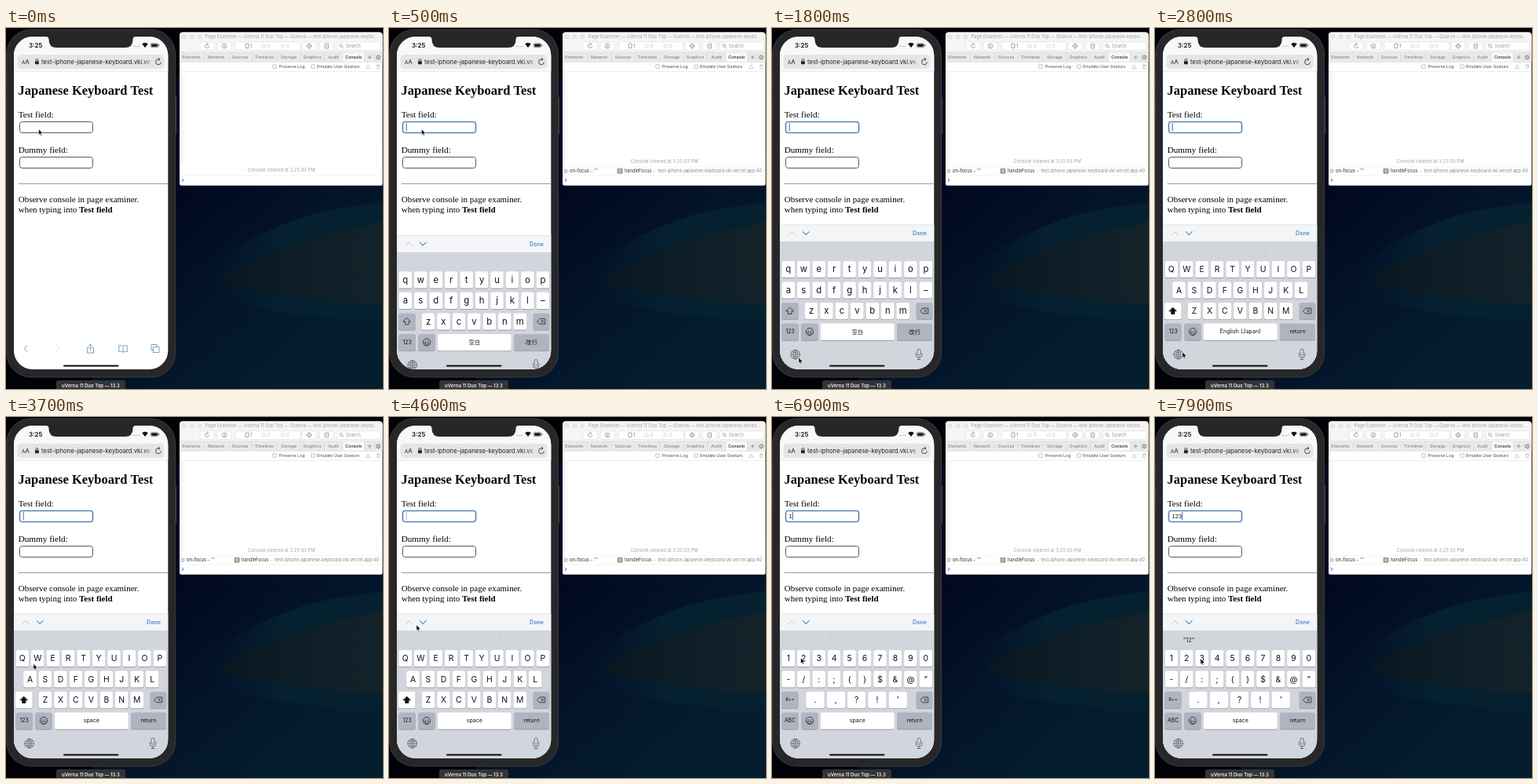
An HTML page with a canvas for the animation above (8 s loop, 480x460 px).

```html
<!DOCTYPE html>
<html lang="en">
<head>
<meta charset="utf-8">
<title>Japanese Keyboard Test</title>
<style>
html, body { margin: 0; width: 100%; height: 100%; overflow: hidden; background: #020a18; }
canvas { display: block; width: 480px; height: 460px; }
</style>
</head>
<body>
<canvas id="stage"></canvas>
<script>
const LOOP = 8000;
const UI = 'Inter, "Liberation Sans", sans-serif';
const SERIF = '"Liberation Serif", "Times New Roman", serif';
const CJK = '"Noto Sans CJK JP", "Noto Sans CJK", sans-serif';
const HOST = 'test-iphone-japanese-keyboard.vki.vercel.app';
const DEVICE = 'uVerna 11 Duo Top';
const BLUE = '#4a8acb', STEEL = '#5f8aad', FN = '#b0b4c0';

const canvas = document.getElementById('stage');
const g = canvas.getContext('2d');
const ratio = window.devicePixelRatio || 1;
canvas.width = 480 * ratio;
canvas.height = 460 * ratio;

const clamp = v => Math.max(0, Math.min(1, v));
const span = (t, a, b) => clamp((t - a) / (b - a));
const smooth = p => p * p * (3 - 2 * p);

function shape(x, y, w, h, r) {
  g.beginPath();
  g.roundRect(x, y, w, h, r);
}
function box(x, y, w, h, r, fill, line, lw = 1) {
  shape(x, y, w, h, r);
  if (fill) { g.fillStyle = fill; g.fill(); }
  if (line) { g.strokeStyle = line; g.lineWidth = lw; g.stroke(); }
}
function text(s, x, y, size, color, align = 'left', font = UI, weight = 400) {
  g.font = `${weight} ${size}px ${font}`;
  g.fillStyle = color;
  g.textAlign = align;
  g.textBaseline = 'alphabetic';
  g.fillText(s, x, y);
  return g.measureText(s).width;
}
function path(d, x, y, color, lw = 1, fill) {
  g.save();
  g.translate(x, y);
  const p = new Path2D(d);
  if (fill) { g.fillStyle = fill; g.fill(p); }
  if (color) {
    g.strokeStyle = color;
    g.lineWidth = lw;
    g.lineJoin = g.lineCap = 'round';
    g.stroke(p);
  }
  g.restore();
}
function ring(x, y, r, color, lw = 0.7, fill) {
  g.beginPath();
  g.arc(x, y, r, 0, 7);
  if (fill) { g.fillStyle = fill; g.fill(); }
  if (color) { g.strokeStyle = color; g.lineWidth = lw; g.stroke(); }
}
function reload(x, y, r, color, lw) {
  g.beginPath();
  g.arc(x, y, r, 0, 5.2);
  g.strokeStyle = color;
  g.lineWidth = lw;
  g.stroke();
  path('M-.5 -1.6L1.4 0L-.5 1.6', x + r * .2, y - r, color, lw);
}
function blend(x0, y0, x1, y1, ...colors) {
  const c = g.createLinearGradient(x0, y0, x1, y1);
  colors.forEach((s, i) => c.addColorStop(i / (colors.length - 1), s));
  return c;
}

function wallpaper() {
  g.fillStyle = blend(225, 200, 400, 400, '#010820', '#03132a', '#041d2f');
  g.fillRect(0, 0, 480, 460);
  g.fillStyle = '#000207';
  g.fillRect(0, 0, 110, 460);
  g.fillRect(0, 0, 480, 60);
  path('M250 325C270 285 320 262 370 244C410 230 440 228 480 222V372C410 370 290 365 250 325Z', 0, 0, null, 0,
    blend(250, 0, 350, 0, '#03182b00', '#05202f'));
  path('M272 322C292 302 316 296 340 286C380 266 425 262 480 246V352C420 350 400 346 350 340C315 336 290 332 272 322Z', 0, 0, null, 0,
    blend(272, 0, 480, 0, '#08161f', '#0e1e27', '#14232a'));
}

function inspector(t) {
  const logged = t >= 300;
  g.save();
  shape(221, 5.5, 258.4, 195.2, [4, 4, 2, 2]);
  g.clip();
  g.fillStyle = '#fff';
  g.fillRect(220, 5, 260, 200);
  g.fillStyle = '#f5f5f5';
  g.fillRect(220, 5, 260, 26);
  g.fillStyle = '#e9e9e9';
  g.fillRect(220, 31, 260, 12);
  box(428, 31, 28, 12, 0, '#f9f9f9');
  for (let i = 0; i < 3; i++) ring(226.5 + i * 10, 11.2, 2.4, '#d2d2d2', .6, '#eaeaea');
  text(`Page Examiner — ${DEVICE} — Quorva — test-iphone-japanese-keybo…`, 253.5, 13.4, 5.75, '#a3a3a3');

  const btn = (x, w) => box(x, 17.8, w, 10.6, 2, '#fff', '#dadada', .6);
  btn(247, 18); btn(269, 18); btn(292, 83); btn(377, 18); btn(399, 18); btn(421, 56);
  reload(256, 23, 2.5, '#888', .7);
  ring(278, 23, 3, '#888');
  path('M0 -1.6V1.4M-1.2 .2L0 1.5L1.2 .2', 278, 23, '#888', .6);
  box(305, 20, 4, 5.5, .5, null, '#777', .7);
  text('1', 311, 25, 5.8, '#777');
  ring(328, 23, 2.2, '#ccc');
  text('0', 333, 25, 5.8, '#c5c5c5');
  ring(352, 23, 2.2, '#ccc');
  text('0', 357, 25, 5.8, '#c5c5c5');
  ring(386, 23, 2.6, '#888');
  path('M-3.6 0H3.6M0 -3.6V3.6', 386, 23, '#888', .5);
  box(406, 20, 4.5, 6, .5, null, '#888', .7);
  path('M1 2H3.5M1 4H3.5', 406, 20, '#888', .5);
  ring(426.5, 22.4, 1.8, '#888');
  path('M0 0L1.8 1.8', 427.8, 23.7, '#888', .7);
  text('Search', 432.5, 25, 5.8, '#999');

  [['Elements', 236], ['Network', 267.5], ['Sources', 298], ['Timelines', 329], ['Storage', 360],
    ['Graphics', 390], ['Audit', 417], ['Console', 442.5]].forEach(([s, x], i) =>
    text(s, x, 39.2, 5.4, i === 7 ? '#222' : '#777', 'center', UI, i === 7 ? 500 : 400));
  path('M-2 0H2M0 -2V2', 463, 37.3, '#777', .7);
  ring(474, 37.3, 2.4, '#777', 1);
  ring(474, 37.3, .8, '#777', .5);
  for (const x of [252, 283, 313, 344, 375, 405, 428, 456, 469]) {
    g.fillStyle = '#d6d6d6';
    g.fillRect(x, 31, .6, 12);
  }
  g.fillRect(220.5, 30.6, 260, .6);
  g.fillRect(220.5, 43, 260, .6);
  g.fillStyle = '#e2e2e2';
  g.fillRect(220.5, 55, 260, .6);
  box(339.7, 46.8, 4.6, 4.6, 1, '#fff', '#999', .6);
  text('Preserve Log', 347.8, 51.2, 5.2, '#444');
  box(388.7, 46.8, 4.6, 4.6, 1, '#fff', '#999', .6);
  text('Emulate User Gesture', 396, 51.2, 5.25, '#444');
  path('M-2.4 2L0 -2.4L2.4 2Z', 461, 49.3, '#bbb', .7);
  path('M-2 -1.6H2M-1.5 -1.6L-1.2 2.6H1.2L1.5 -1.6M-.7 -2.6H.7', 474, 49.3, '#aaa', .6);

  g.fillStyle = blend(220, 0, 230, 0, '#f3f3f3', '#fff');
  g.fillRect(220.5, 56, 10, 116);

  text('Console cleared at 3:25:03 PM', 350.5, logged ? 172.3 : 183, 5.9, '#a4a4a4', 'center');
  if (logged) {
    g.fillStyle = '#ececec';
    g.fillRect(220.5, 176, 260, .5);
    box(223.5, 180, 3.4, 4.4, .5, '#ddd', '#999', .5);
    const w = text('on-focus', 230, 184.3, 5.8, '#222');
    text(' – ""', 230 + w, 184.3, 5.8, '#555');
    box(290.5, 178.7, 7, 7, 1, '#93a596');
    text('f', 294, 184.3, 5.4, '#fff', 'center', SERIF, 700);
    text('handleFocus', 300, 184.3, 5.7, '#333');
    text('—', 338, 184.3, 4.5, '#aaa', 'center');
    text(HOST + ':40', 474.8, 184.3, 5.65, '#888', 'right');
  }
  g.fillStyle = '#e6e6e6';
  g.fillRect(220.5, 187.8, 260, .5);
  path('M0 -1.8L1.7 0L0 1.8', 224.3, 194, '#2d6fd0', 1);
  g.restore();
}

function page(t) {
  g.fillStyle = '#fff';
  g.fillRect(9, 10, 199, 428);
  g.fillStyle = '#f8f8f9';
  g.fillRect(9, 10, 199, 45);
  g.fillStyle = '#dcdcde';
  g.fillRect(9, 55, 199, .6);
  text('3:25', 37.6, 25, 7.9, '#111', 'center', UI, 600);
  for (let i = 0; i < 4; i++) ring(162.5 + i * 2.3, 23.3, .6, null, 0, '#888');
  path('M-3.8 -2.3A5.4 5.4 0 0 1 3.8 -2.3L0 2.4Z', 177, 22.5, null, 0, '#111');
  box(184.3, 19.6, 9.4, 5, 1.4, null, '#555', .6);
  box(185.2, 20.5, 7.6, 3.2, .7, '#111');
  g.fillRect(194.4, 21.2, .8, 1.8);

  box(14.5, 34, 187, 18, 5, '#e5e5e8');
  text('A', 20, 46, 6.2, '#222');
  text('A', 24.2, 46, 8, '#222');
  box(37, 42.2, 4.8, 4, .8, '#222');
  path('M0 0V-1.3A1.4 1.4 0 0 1 2.8 -1.3V0', 38, 42.2, '#222', .8);
  g.save();
  g.beginPath();
  g.rect(44, 34, 139.5, 18);
  g.clip();
  text(HOST, 45, 45.7, 7.7, blend(176, 0, 184, 0, '#222', '#22222240'));
  g.restore();
  reload(194, 43.3, 3.4, '#222', .8);

  text('Japanese Keyboard Test', 15.6, 85.3, 16.5, '#000', 'left', SERIF, 700);
  text('Test field:', 15.7, 114.3, 11.2, '#000', 'left', SERIF);
  text('Dummy field:', 15.7, 158.8, 11.2, '#000', 'left', SERIF);
  box(17.5, 119.5, 93, 14, 3, '#fff', '#5a5a5a', 1);
  box(17.5, 164.5, 93, 14, 3, '#fff', '#5a5a5a', 1);
  g.fillStyle = '#9b9b9b';
  g.fillRect(15.7, 198, 191, 1);
  text('Observe console in page examiner.', 15.7, 221.5, 11, '#000', 'left', SERIF);
  const w = text('when typing into ', 15.7, 235.4, 11, '#000', 'left', SERIF);
  text('Test field', 15.7 + w, 235.4, 11, '#000', 'left', SERIF, 700);

  if (t >= 200) {
    box(17.5, 119.5, 93, 14, 3, '#fff', '#a9c0e0', 2.2);
    box(17.5, 119.5, 93, 14, 3, null, '#5a80b4', 1);
    const typed = '123'.slice(0, TAPS.filter(a => t >= a).length);
    const x = 21.8 + text(typed, 21.6, 129.2, 7.5, '#111', 'left', '"Liberation Sans", sans-serif');
    g.globalAlpha = caret(t);
    g.fillStyle = '#4a66a0';
    g.fillRect(x - .1, 121.3, 1, 10);
    g.globalAlpha = 1;
  }

  path('M2 -4L-2 0L2 4', 25, 408.5, STEEL, .9);
  path('M-2 -4L2 0L-2 4', 66, 408.5, '#d8dade', .9);
  path('M-1.7 -1.8H-4V5H4V-1.8H1.7M0 2V-6M-2 -4L0 -6L2 -4', 107.5, 409, STEEL, .8);
  path('M0 -3C-1.5 -4.4 -4 -4.3 -5.3 -3.8V4C-4 3.4 -1.5 3.4 0 4.6C1.5 3.4 4 3.4 5.3 4V-3.8C4 -4.3 1.5 -4.4 0 -3V4.6', 149, 408.5, STEEL, .8);
  path('M-2.2 -2.2H5V5H-2.2ZM-2.2 2H-5V-5H2.2V-2.2', 190, 408.5, STEEL, .8);
}

const TAPS = [6600, 7200, 7700];
function caret(t) {
  const from = [400, ...TAPS].filter(a => a <= t).pop() ?? 400;
  const p = ((t - from) % 1070 + 1070) % 1070;
  return t < 400 ? 1 : Math.max(1 - span(p, 520, 640), span(p, 930, 1050));
}

function key(label, cx, cy, w, size = 10.4, fill = '#fff', font = UI) {
  box(cx - w / 2, cy - 9.8, w, 21.5, 2.6, '#9a9da5');
  box(cx - w / 2, cy - 10.4, w, 21.2, 2.6, fill);
  if (label) text(label, cx, cy + size * .36, size, '#111', 'center', font);
}
const row = (s, x, step, y, w, size) =>
  s.split(' ').forEach((c, i) => key(c, x + i * step, y, w, size));

function popup(i) {
  const x = 20.8 + i * 19.45;
  g.save();
  g.shadowColor = 'rgba(0,0,0,.3)';
  g.shadowBlur = 2;
  path('M-9 -33H9Q12.5 -33 12.5 -29V-18C12.5 -13 8.3 -12 8.3 -8V10.5H-8.3V-8C-8.3 -12 -12.5 -13 -12.5 -18V-29Q-12.5 -33 -9 -33Z',
    Math.max(x, 22.5), 307.3, null, 0, '#fff');
  g.restore();
  text(String(i + 1), Math.max(x, 22.5), 293, 16, '#111', 'center');
}

function keyboard(t) {
  const mode = t < 2200 ? 'kana' : t < 5700 ? 'caps' : 'num';
  g.save();
  g.translate(0, 195 * (1 - span(t, 200, 710)) ** 3);
  g.fillStyle = '#d3d5dd';
  g.fillRect(9, 272, 199, 180);
  g.fillStyle = '#f4f5f7';
  g.fillRect(9, 251, 199, 21);
  g.fillStyle = '#d0d2d6';
  g.fillRect(9, 250.6, 199, .6);
  path('M-4 2L0 -2L4 2', 25.3, 261.7, '#d0d3d8', 1.1);
  path('M-4 -2L0 2L4 -2', 43.2, 261.7, BLUE, 1.1);
  text('Done', 188, 264.3, 7.1, BLUE, 'center', UI, 600);

  if (mode !== 'kana') {
    g.fillStyle = '#c5c8cf';
    g.fillRect(74.7, 277, .7, 13);
    g.fillRect(140.7, 277, .7, 13);
  }
  if (t >= 7500) text('“12”', 43, 286.8, 7.6, '#222', 'center');

  const X = 20.8, S = 19.45, W = 16.6;
  if (mode === 'num') {
    row('1 2 3 4 5 6 7 8 9 0', X, S, 307.3, W);
    row('- / : ; ( ) $ & @ ”', X, S, 333.8, W);
    row('. , ? ! ’', 55, 26.3, 360.4, 23.4);
    key('#+=', 22.8, 360.4, 21.5, 5.8, FN);
  } else if (mode === 'caps') {
    row('Q W E R T Y U I O P', X, S, 307.3, W);
    row('A S D F G H J K L', 30.5, S, 333.8, W);
    row('Z X C V B N M', 50, S, 360.4, W);
    key('', 22.8, 360.4, 21.5);
  } else {
    row('q w e r t y u i o p', X, S, 307.3, W, 11.3);
    row('a s d f g h j k l –', X, S, 333.8, W, 11.3);
    row('z x c v b n m', 50, S, 360.4, W, 11.3);
    key('', 22.8, 360.4, 21.5, 8, FN);
  }
  if (mode !== 'num')
    path('M0 -4.2L4.6 .4H2.2V4H-2.2V.4H-4.6Z', 22.8, 360.4, '#111', .7, mode === 'caps' ? '#111' : null);
  key('', 194, 360.4, 20.5, 8, FN);
  path('M-5 0L-1.8 -3.4H5V3.4H-1.8ZM0 -1.5L3 1.5M3 -1.5L0 1.5', 193.8, 360.4, '#111', .7);

  key(mode === 'num' ? 'ABC' : '123', 23.2, 387, 21.5, 6.9, FN);
  key('', 48, 387, 21.5, 8, FN);
  ring(48, 387, 4.6, '#222', .8);
  ring(46.4, 385.8, .6, null, 0, '#222');
  ring(49.6, 385.8, .6, null, 0, '#222');
  path('M-2.7 .8H2.7A2.7 2.7 0 0 1 -2.7 .8Z', 48, 387, '#222', .6);
  key('', 108.8, 387, 94);
  if (mode === 'kana') {
    text('空白', 108.8, 389.8, 7.4, '#222', 'center', CJK);
    key('改行', 181.5, 387, 45, 7.4, FN, CJK);
  } else {
    const fade = span(t, 3250, 3500);
    g.globalAlpha = 1 - fade;
    text('English (Japan)', 108.8, 389.4, 7.1, '#111', 'center');
    g.globalAlpha = fade;
    text('space', 108.8, 389.2, 7.1, '#111', 'center');
    g.globalAlpha = 1;
    key('return', 181.5, 386.8, 45, 7.1, FN);
  }

  ring(29.7, 416, 5.8, '#555b64', .8);
  path('M-5.8 0H5.8M0 -5.8V5.8M0 -5.8C-3.8 -3 -3.8 3 0 5.8C3.8 3 3.8 -3 0 -5.8M-4.6 -3.2Q0 -1.8 4.6 -3.2M-4.6 3.2Q0 1.8 4.6 3.2', 29.7, 416, '#555b64', .7);
  box(185, 409, 4.2, 8.2, 2.1, null, '#555b64', .8);
  path('M-4 -1V.6A4 4 0 0 0 4 .6V-1M0 4.6V7M-2 7H2', 187.1, 415.4, '#555b64', .8);

  TAPS.forEach((a, i) => { if (t >= a - 50 && t < a + 60) popup(i); });
  g.restore();
}

function phone(t) {
  box(0, 60, 2, 18, 0, '#3a3a3c');
  box(0, 90, 2, 25, 0, '#3a3a3c');
  box(215, 88, 2.2, 47, 0, '#3a3a3c');
  box(.8, 2, 214.8, 443, 31, '#272729', '#3b3b3e', 1);
  g.save();
  shape(10, 11, 196.3, 424, 24);
  g.clip();
  page(t);
  if (t >= 200) keyboard(t);
  box(73, 429.4, 70.5, 2, 1, '#0a0a0a');
  g.restore();
  path('M51 10H165V11Q161.5 11 161.5 14.5V15Q161.5 25 151.5 25H64.5Q54.5 25 54.5 15V14.5Q54.5 11 51 11Z', 0, 0, null, 0, '#272729');
  box(64, 449, 88, 16, 2.5, '#333437');
  text(`${DEVICE} — 13.3`, 108, 458.4, 6, '#f2f2f2', 'center', UI, 600);
}

// time, x, y
const MOVES = [
  [0, 41.6, 129], [1000, 41.2, 129], [1700, 34, 420], [2450, 34, 420], [2800, 35, 413],
  [3150, 35, 413], [4050, 35, 265], [4700, 35, 265], [5350, 20, 398], [5850, 20, 398],
  [6300, 19, 310], [6680, 19, 309], [6880, 36.6, 307], [7350, 37, 308], [7600, 58, 308], [8000, 58, 308]
];
function pointer(t) {
  const i = MOVES.findIndex((m, n) => n && t <= m[0]);
  const a = MOVES[i - 1], b = MOVES[i], p = smooth(span(t, a[0], b[0]));
  path('M0 0V7.2L1.6 5.8L2.7 8.2L3.9 7.7L2.8 5.3H5Z',
    a[1] + (b[1] - a[1]) * p, a[2] + (b[2] - a[2]) * p, 'rgba(255,255,255,.8)', .7, '#000');
}

function draw(now) {
  const t = now % LOOP;
  g.setTransform(ratio, 0, 0, ratio, 0, 0);
  wallpaper();
  inspector(t);
  phone(t);
  pointer(t);
  requestAnimationFrame(draw);
}
requestAnimationFrame(draw);
</script>
</body>
</html>
```
